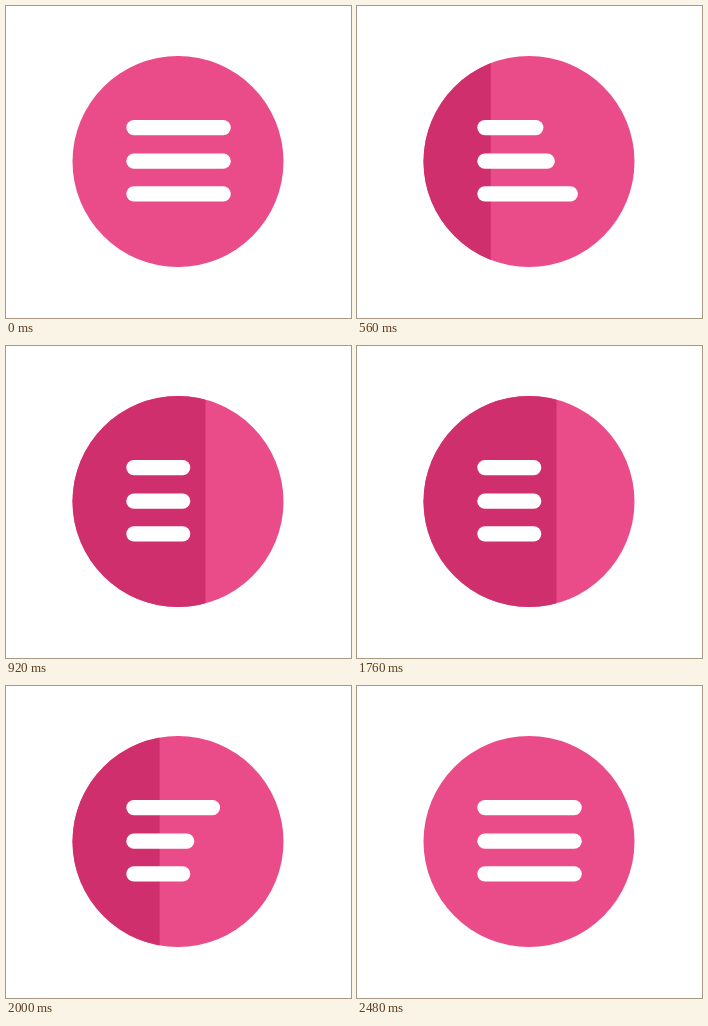
Recreate the animation shown at these times as an HTML page. Size 345 by 312 pixels, loop 2.88 s.

```html
<!DOCTYPE html>
<html lang="en">
<head>
<meta charset="utf-8">
<title>Menu toggle</title>
<style>
  html, body {
    margin: 0;
    width: 100%;
    height: 100%;
    overflow: hidden;
    background: #fff;
  }

  svg {
    display: block;
    width: 100%;
    height: 100%;
  }

  .disc { fill: #ea4c89; }
  .panel { fill: #d02f6d; }
  .bar { fill: #fff; }

  /* Negative delays put every part mid-cycle at load */
  .panel, .bar {
    animation: 2880ms linear calc(var(--at) - 2880ms) infinite;
  }

  .panel {
    --at: 160ms;
    animation-name: slide;
  }

  .bar {
    width: 104.5px;
    animation-name: shrink;
  }

  @keyframes slide {
    0% {
      transform: translateX(-143px);
      animation-timing-function: cubic-bezier(.33, 0, .67, 1);
    }
    26.39% { transform: none; }
    55.56% {
      transform: none;
      animation-timing-function: cubic-bezier(.64, 0, .8, 1);
    }
    70.83%, 100% { transform: translateX(-143px); }
  }

  @keyframes shrink {
    0% {
      width: 104.5px;
      animation-timing-function: cubic-bezier(.4, 0, .2, 1);
    }
    15.28% { width: 64px; }
    53.82% {
      width: 64px;
      animation-timing-function: cubic-bezier(.4, 0, .2, 1);
    }
    69.1%, 100% { width: 104.5px; }
  }
</style>
</head>
<body>
<svg viewBox="0 0 345 312">
  <clipPath id="round"><circle cx="172" cy="155.5" r="105.5"/></clipPath>
  <circle class="disc" cx="172" cy="155.5" r="105.5"/>
  <g clip-path="url(#round)">
    <rect class="panel" x="-60" y="40" width="259.5" height="230"/>
  </g>
  <rect class="bar" style="--at: 244ms" x="120.3" y="114" height="15.2" rx="7.6"/>
  <rect class="bar" style="--at: 373ms" x="120.3" y="147.6" height="15.2" rx="7.6"/>
  <rect class="bar" style="--at: 484ms" x="120.3" y="180.2" height="15.2" rx="7.6"/>
</svg>
</body>
</html>
```
